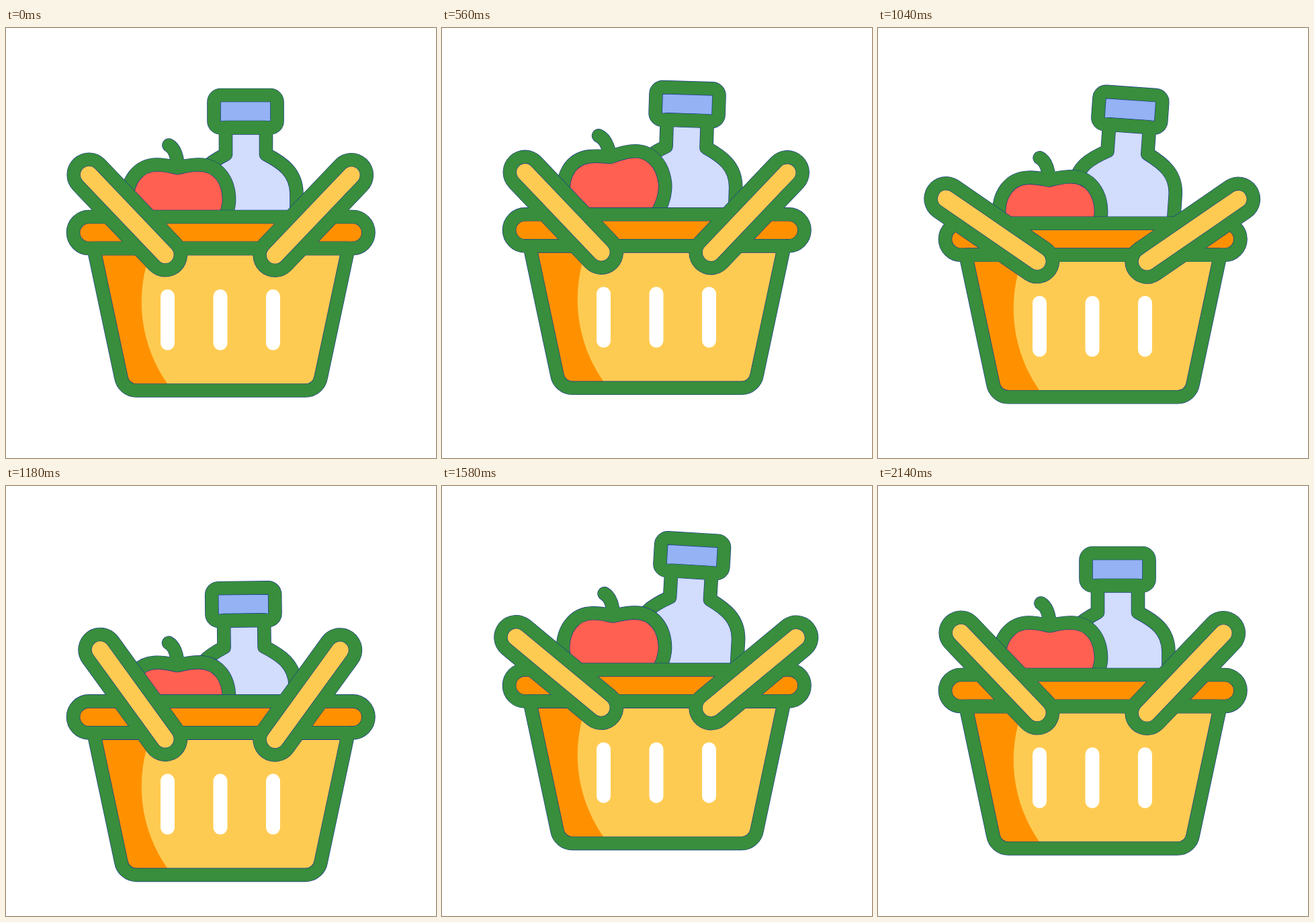
An HTML page that plays this animation: 640 px wide and 640 px high, repeating every 2200 ms.

```html
<!DOCTYPE html>
<html lang="en">
<head>
<meta charset="utf-8">
<title>Grocery basket</title>
<style>
  html, body { margin: 0; width: 100%; height: 100%; overflow: hidden; background: #fff; }
  svg { display: block; width: 100vw; height: 100vh; }

  .edge, .line { fill: none; stroke-linecap: round; stroke-linejoin: round; }
  .edge { stroke: #1a348f; stroke-width: 20.6; }
  .line { stroke: #388e3c; stroke-width: 19.3; }
  .edge .arm { stroke-width: 66.2; }
  .line .arm { stroke-width: 65; }
  .rod { stroke-linecap: round; }
  .slots { stroke: #fff; stroke-width: 21; stroke-linecap: round; }

  .hop, .bottle, .apple, .arm {
    animation: 2200ms cubic-bezier(.37, 0, .63, 1) infinite;
  }
  .hop { animation-name: hop; }
  .bottle { animation-name: bottle-lift, bottle-tilt; transform-origin: 356.5px 395px; }
  .apple { animation-name: apple-lift, apple-tilt; transform-origin: 256px 252px; }
  .arm { animation-name: flap; }
  .left { --side: -1; transform-origin: 237px 337.5px; }
  .right { --side: 1; transform-origin: 400.5px 338px; }

  @keyframes hop {
    0%, 9.1% { translate: 0 0; }
    18.2% { translate: 0 40px; animation-timing-function: cubic-bezier(.2, 0, .5, 1); }
    36.6% { translate: 0 -45px; }
    54.7% { translate: 0 40px; }
    63.8% { translate: 0 -15px; }
    80%, 100% { translate: 0 0; }
  }
  @keyframes bottle-lift {
    0%, 9.1% { translate: 0 0; }
    17.7% { translate: 0 5px; }
    40.4% { translate: 0 -41.5px; animation-timing-function: cubic-bezier(.22, 0, .52, 1); }
    58.2% { translate: 0 18px; }
    66.8% { translate: 0 -21px; }
    79.1%, 100% { translate: 0 0; }
  }
  @keyframes bottle-tilt {
    0%, 17.7% { rotate: 0deg; }
    40.4% { rotate: 6.9deg; }
    58.2% { rotate: -2deg; }
    68.2% { rotate: 4deg; }
    81.8%, 100% { rotate: 0deg; }
  }
  @keyframes apple-lift {
    0%, 9.1% { translate: 0 0; }
    15.9% { translate: 0 3px; }
    38% { translate: 0 -36.5px; animation-timing-function: cubic-bezier(.3, 0, .5, 1); }
    52.7% { translate: 0 20px; }
    67.7% { translate: 0 -9px; }
    80.9%, 100% { translate: 0 0; }
  }
  @keyframes apple-tilt {
    0%, 11.8% { rotate: 0deg; }
    39.1% { rotate: -14deg; }
    48.9% { rotate: -.5deg; }
    59.1% { rotate: 0deg; }
    68.2% { rotate: -.8deg; }
    80.9%, 100% { rotate: 0deg; }
  }
  @keyframes flap {
    0%, 9.1% { rotate: 0deg; }
    17.7% { rotate: calc(var(--side) * -13deg); }
    39.5% { rotate: calc(var(--side) * 32.8deg); animation-timing-function: cubic-bezier(.3, 0, .6, 1); }
    56.8% { rotate: calc(var(--side) * -10.5deg); }
    67.3% { rotate: calc(var(--side) * 9.7deg); }
    79.5%, 100% { rotate: 0deg; }
  }
</style>
</head>
<body>
<svg viewBox="0 0 640 640">
  <defs>
    <path id="flask" d="M327 148V188C304 200 281.500 214 281.500 247V380Q281.500 395 296 395H418Q432.500 395 432.500 380V247C432.500 214 410 200 387 188V148Z"/>
    <rect id="cap" x="309.500" y="100" width="94" height="48.500" rx="10"/>
    <path id="fruit" d="M255.500 208C246 206 238 203.500 225 203.500C196 203.500 180 228 180 256C180 278 200 318 232 318C244 318 248 316 256 316C264 316 268 318 280 318C312 318 332 278 332 256C332 228 317 203.500 287 203.500C273 203.500 265 206 255.500 208Z"/>
    <path id="stem" d="M242.500 174.500Q254 181 255.500 205"/>
    <rect id="rim" x="100" y="281" width="439.500" height="47" rx="23.500"/>
    <path id="tub" d="M130.500 328L171.300 520A23 23 0 0 0 194 539.500H446A23 23 0 0 0 468.700 520L509.500 328Z"/>
    <path id="armL" d="M123.500 218.500L237 337.500"/>
    <path id="armR" d="M514 219L400.500 338"/>

    <g id="bottleLines"><use href="#flask"/><use href="#cap"/></g>
    <g id="appleLines"><use href="#fruit"/><use href="#stem"/></g>
  </defs>

  <g class="hop">
    <g class="bottle">
      <use href="#flask" fill="#d2dcfd"/>
      <use href="#cap" fill="#94b2f4"/>
      <use href="#bottleLines" class="edge"/>
      <use href="#bottleLines" class="line"/>
    </g>

    <g class="apple">
      <use href="#fruit" fill="#ff6051"/>
      <use href="#appleLines" class="edge"/>
      <use href="#appleLines" class="line"/>
    </g>

    <use href="#tub" fill="#ff9100"/>
    <path fill="#fecb52" d="M216.500 330A212 212 0 0 0 240.500 530L247 539H446L468 520L508 330Z"/>
    <use href="#rim" fill="#ff9100"/>
    <path class="slots" d="M240.500 399.500V469M319 399.500V469M397.500 399.500V469"/>

    <g class="edge">
      <use href="#tub"/><use href="#rim"/>
      <use href="#armL" class="arm left"/><use href="#armR" class="arm right"/>
    </g>
    <g class="line">
      <use href="#tub"/><use href="#rim"/>
      <use href="#armL" class="arm left"/><use href="#armR" class="arm right"/>
    </g>
    <g class="rod" stroke="#1a348f">
      <use href="#armL" class="arm left" stroke-width="26.600"/>
      <use href="#armR" class="arm right" stroke-width="26.600"/>
    </g>
    <g class="rod" stroke="#fecb52">
      <use href="#armL" class="arm left" stroke-width="25.400"/>
      <use href="#armR" class="arm right" stroke-width="25.400"/>
    </g>
  </g>
</svg>
</body>
</html>
```
